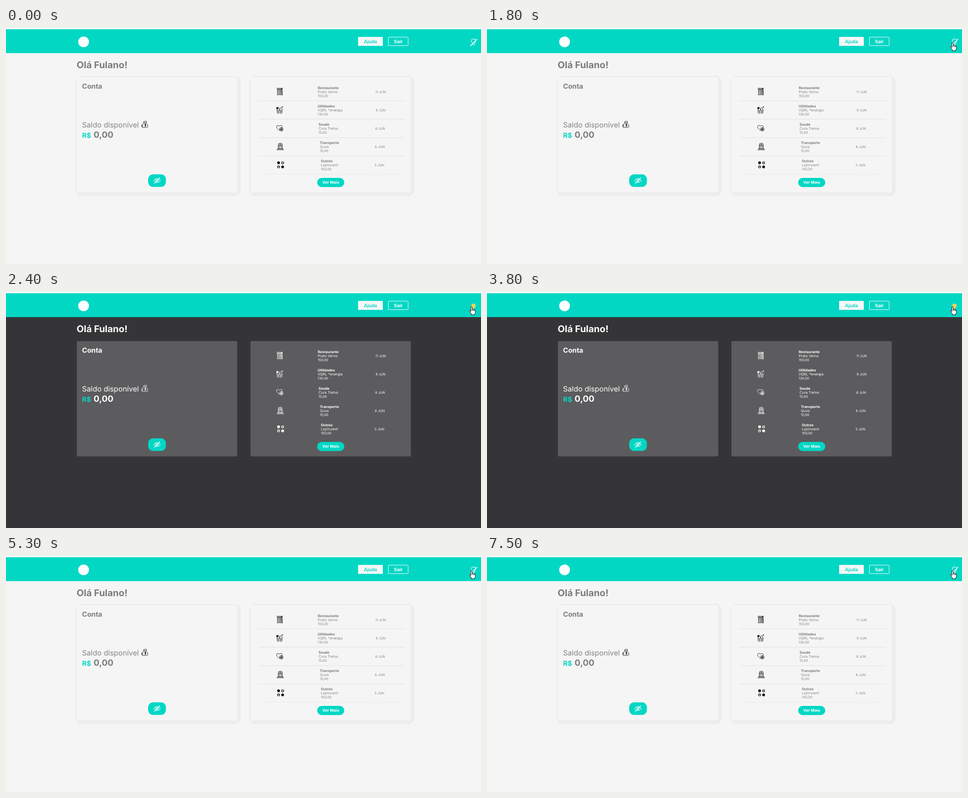
An HTML page for the animation above (8 s loop, 1059 px wide and 529 px high).

```html
<!DOCTYPE html>
<html lang="pt-BR">
<head>
<meta charset="utf-8">
<title>Conta</title>
<style>
  html, body { margin: 0; width: 100%; height: 100%; overflow: hidden; background: #f5f5f5; }
  svg { display: block; width: 100%; height: 100%; font-family: Inter, "Open Sans", sans-serif; text-rendering: geometricPrecision; }
  #stage { animation: theme 8s step-end infinite; }
  .bg { fill: var(--bg); }
  .card { fill: var(--card); }
  .light { opacity: var(--light); }
  .teal { fill: #02d7c4; }
  .text { fill: var(--text); }
  .soft { fill: var(--soft); }
  .white { fill: #fff; }
  .bold { font-weight: 700; }
  .semi { font-weight: 600; }
  .icon { fill: none; stroke: var(--ink); stroke-width: .9; stroke-linecap: round; stroke-linejoin: round; }
  .icon .solid { fill: var(--ink); }
  .line { fill: none; stroke: #fff; stroke-linecap: round; stroke-linejoin: round; }
  .off { animation: lampOff 8s step-end infinite; }
  .on { animation: lampOn 8s step-end infinite; }
  .pointer { animation: move 8s step-end infinite; }
  .arrow { animation: arrow 8s step-end infinite; }
  .hand { animation: hand 8s step-end infinite; }

  @keyframes theme {
    0%, 37.5%, 66.25%, 93.75% {
      --bg: #f5f5f5; --card: #f5f5f5; --text: #7c7c7c; --soft: #858585; --ink: #111; --light: 1;
    }
    27.5%, 47.5%, 78.75% {
      --bg: #353537; --card: #5c5c5e; --text: #fff; --soft: #fff; --ink: #fff; --light: 0;
    }
  }
  @keyframes lampOff {
    0%, 37.5%, 66.25%, 93.75% { opacity: 1; }
    30%, 47.5%, 78.75% { opacity: 0; }
  }
  @keyframes lampOn {
    0%, 37.5%, 66.25%, 93.75% { opacity: 0; }
    30%, 47.5%, 78.75% { opacity: 1; }
  }
  @keyframes move {
    0% { transform: translate(720px, 259px); }
    3.75% { transform: translate(720px, 259px); animation-timing-function: steps(4); }
    8.75% { transform: translate(905px, 122px); animation-timing-function: steps(4); }
    13.75% { transform: translate(1011px, 52px); }
    15% { transform: translate(1028px, 46px); }
    17.5% { transform: translate(1031px, 43px); animation-timing-function: steps(4); }
    22.5%, 100% { transform: translate(1038px, 32px); }
  }
  @keyframes arrow {
    0%, 18.75% { opacity: 0; }
    3.75% { opacity: 1; }
  }
  @keyframes hand {
    0% { opacity: 0; }
    18.75%, 100% { opacity: 1; }
  }
</style>
</head>
<body>
<svg id="stage" viewBox="0 0 1059 529" preserveAspectRatio="none">
  <rect class="bg" width="1059" height="529"/>
  <rect width="1059" height="4" fill="#f9f9f9"/>
  <rect class="teal" y="2.7" width="1059" height="53.6"/>

  <circle class="white" cx="173" cy="31" r="12"/>
  <rect x="785" y="20" width="55" height="20" rx="1" fill="#f7f7f7"/>
  <text class="teal semi" x="798" y="34" font-size="10.5">Ajuda</text>
  <rect class="line" x="852.5" y="20.5" width="44" height="19" rx="1"/>
  <text class="white bold" x="865" y="34" font-size="10.2">Sair</text>

  <g class="off line" stroke-width="1.1">
    <path d="M1039.8 35.5v-2.2q-2.6-2-2.3-4.8a5 5 0 0 1 9.8 0q.2 2.7-2.2 4.8v2.2zM1040.5 38h4"/>
    <path d="M1035.5 40L1050 25" stroke-width="1.6"/>
  </g>
  <g class="on">
    <path d="M1042 24.5v2M1036.5 27l1.5 1.2M1047.5 27l-1.5 1.2M1035.5 32h2M1046.5 32h2" stroke="#f0c75a"/>
    <path d="M1040 37v-2.2a4.6 4.6 0 1 1 4.4 0v2.2z" fill="#f5d65d"/>
    <path d="M1040 37h4.4v1.8h-4.4z" fill="#8f8d83"/>
  </g>

  <text class="text bold" x="157.5" y="90" font-size="20.8">Olá Fulano!</text>

  <g class="light" fill="#ececec">
    <rect x="155" y="107" width="368" height="269.5" rx="14"/>
    <rect x="542.5" y="107" width="368" height="269.5" rx="14"/>
  </g>
  <rect class="card" x="158" y="110" width="357.5" height="258.5" rx="2"/>
  <rect class="card" x="545" y="110" width="357.5" height="258.5" rx="2"/>

  <text class="text bold" x="169.5" y="136" font-size="15.4">Conta</text>
  <text class="soft" x="169.5" y="223.3" font-size="16.4">Saldo disponível</text>
  <g class="icon">
    <path d="M307.5 213q-4 3.5-3.6 7.2.4 2.6 3 2.6h7.4q2.2-.3 2.1-2.8-.3-4-4.2-7zM307.5 213l-1-3 2 .5 1.2-2.2 1.5 1.6 2.3-.9-1.3 4"/>
    <path d="M303.8 215.5q-2 2-1.4 5.5.4 1.5 2 1.6"/>
    <path d="M311.8 215.5q-2-.8-2.3.7 0 1.2 1.3 1.5 1.6.4 1.2 1.7-.5 1.2-2.6.4M310.7 214.6v6" stroke-width="1.1"/>
  </g>
  <text class="teal bold" x="169.8" y="246" font-size="15">R$</text>
  <text class="text bold" x="195.3" y="246.3" font-size="19.2">0,00</text>

  <rect class="teal" x="317" y="328" width="39.5" height="28.3" rx="11"/>
  <g class="line" stroke-width="1.1">
    <path d="M329.5 342q7-9.5 14.5 0-7.500 9-14.500 0z"/>
    <circle cx="336.700" cy="342" r="2.500"/>
    <path d="M331 348.200L342.700 335.800" stroke-width="1.400"/>
  </g>

  <g id="rows"></g>
  <g class="icon">
    <path d="M604.5 134.500v4.500M606.500 134.500v4.500M608.300 134.500v4.500M604.500 139q2 3 3.800 0M605.500 141l-.5 9h2.500l-.5-9"/>
    <path d="M609.300 137q0-2.300 1.400-2.300t1.300 2.300-1.300 3.200-1.400-3.200zM610.200 141l-.4 9h2l-.4-9"/>
    <path d="M615.800 134.500q-2.500 2-2.500 7.500h1.200l-.5 8h2zM613 134.500v4" stroke-width="1.100"/>
  </g>
  <g class="icon" stroke-width=".8">
    <circle class="solid" cx="605" cy="179.500" r="1.800"/>
    <path d="M602.500 179.500h5M605 177v5M604 183l1 8h3.500v-5.500l1.500-4 1.500 4v5.500h3.500l1-8M604 183l3.500-4.500 2.500 2 2.500-2 3 4.500M614 179l2.500-2M615 176.500h2v2M609 184.500q1-2 2 0M606.500 184v4M613.500 184v4"/>
  </g>
  <g class="icon">
    <path d="M609.500 229.800l-5-5q-3-3.500-.3-5.800 3-1.800 5.300 1 2.400-2.800 5.400-.8 2 1.800.8 4"/>
    <circle cx="613.800" cy="227" r="3.800" stroke-width="1.100"/>
    <path d="M611.800 227h4M613.800 225v4" stroke-width="1.700"/>
  </g>
  <g class="icon">
    <path d="M607 269.500q-.8-7 .8-10.500 3.700-1.800 7.400 0 1.600 3.500.8 10.500zM608.500 262h6v3h-6zM611.500 262v3M610 260.200h3M607 269.500l-2.800 3.700M616 269.500l2.800 3.700M606 271h11M604.500 273h14"/>
    <circle class="solid" cx="609" cy="267.300" r=".5"/>
    <circle class="solid" cx="614" cy="267.300" r=".5"/>
  </g>
  <g class="icon" style="stroke-width:1.400">
    <circle class="solid" cx="607.700" cy="302.200" r="2.400"/>
    <circle cx="616.700" cy="302.200" r="2.300"/>
    <circle cx="607.700" cy="311.300" r="2.300"/>
    <circle class="solid" cx="616.700" cy="311.300" r="2.400"/>
  </g>

  <rect class="teal" x="693.700" y="336" width="60.500" height="20.500" rx="10.200"/>
  <text class="white bold" x="705.300" y="349.300" font-size="8.800">Ver Mais</text>

  <g class="pointer" fill="#fff" stroke="#000" stroke-linejoin="round">
    <path class="arrow" d="M.5.5v14l3.200-3 2.200 5 2-.9-2.200-4.800h4.300z"/>
    <path class="hand" d="M-1.500 12V2Q-1.400.5 0 .5T1.500 2v5q2-1 2.600.6 1.700-.8 2.300.7 2.200-.5 2.300 1.500v3.500q-.1 2.400-1.700 4v1.700H-.3v-1.800l-4.200-5.600q-1-1.500.3-2 1.300-.2 2.700 2.400zM1.500 7v3M4.100 7.800v2.700M6.400 8.500v2.500"/>
  </g>
</svg>
<script>
  const rows = [
    ["Restaurante", "Prato Verno", "150,00", "11 JUN", 695, 823.5],
    ["Utilidades", "VQRL *energia", "130,00", "9 JUN", 694.7, 824],
    ["Saude", "Cura Trelva", "15,00", "8 JUN", 696.7, 823],
    ["Transporte", "Quvo", "15,00", "8 JUN", 699.8, 822.3],
    ["Outros", "LojiVurent", "150,00", "5 JUN", 702, 821.7]
  ];
  const label = (cls, x, y, size, str) =>
    `<text class="${cls}" x="${x}" y="${y}" font-size="${size}">${str}</text>`;

  document.getElementById("rows").innerHTML = rows.map(([kind, shop, sum, day, x, dx], i) => {
    const y = 137 + 41.1 * i;
    const last = i === rows.length - 1;
    const rule = last ? "M572 327.5h308" : `M563 ${y + 26.4}h326`;
    return label("text bold", x, y, 7.9, kind)
      + label("soft", x, y + 8.8, 8, shop)
      + label("soft", x, y + 17.6, 7.5, sum)
      + label("soft", dx, y + 8.6, 7.4, day)
      + `<path class="light" d="${rule}" stroke="${last ? "#efefef" : "#e9e9e9"}" stroke-width="1.8"/>`
      + `<path class="light" d="M890.5 ${y}v13" stroke="#efefef"/>`;
  }).join("");
</script>
</body>
</html>
```
